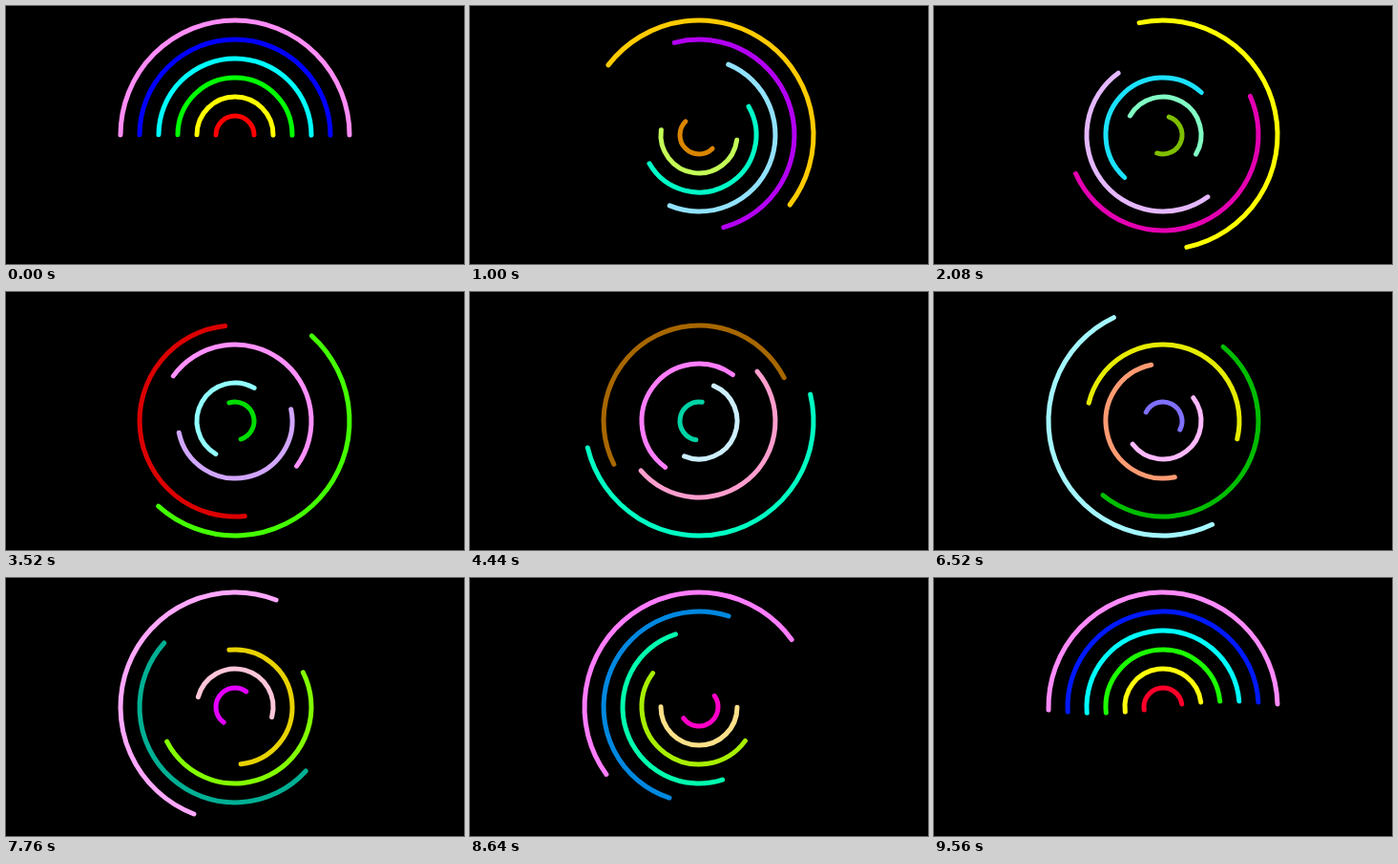
Write an HTML page that moves like this. It is 480 px wide and 270 px high and loops after 9.6 s.

```html
<!DOCTYPE html>
<html lang="en">
<head>
<meta charset="utf-8">
<title>Rainbow rings</title>
<style>
  html, body { margin: 0; width: 100%; height: 100%; overflow: hidden; background: #000; }
  svg { display: block; width: 100vw; height: 100vh; }
  path { fill: none; stroke-width: 5; stroke-linecap: round; }
</style>
</head>
<body>
<svg id="stage" viewBox="0 0 480 270"></svg>
<script>
const LOOP = 9600;
const CX = 240, CY = 135, GAP = 20;

// Linear-light base colours, innermost ring first.
const BASES = [
  [1, 0, 0], [1, 1, 0], [0, 1, 0],
  [0, 1, 1], [0, 0, 1], [2.23, 0.266, 0.93]
];

const stage = document.getElementById('stage');

// Split a colour into luma and a polar chroma vector.
function toPolar([r, g, b]) {
  const y = 0.299 * r + 0.587 * g + 0.114 * b;
  const cb = (b - y) / 1.772, cr = (r - y) / 1.402;
  return { y, chroma: Math.hypot(cb, cr), hue: Math.atan2(cr, cb) };
}

function encode(v) {
  const c = Math.min(1, Math.max(0, v));
  const s = c <= 0.0031308 ? 12.92 * c : 1.055 * c ** (1 / 2.4) - 0.055;
  return Math.round(255 * s);
}

// Turn the hue at constant luma, then clip to the screen gamut.
function shifted({ y, chroma, hue }, turn) {
  const cb = chroma * Math.cos(hue + turn);
  const cr = chroma * Math.sin(hue + turn);
  const rgb = [y + 1.402 * cr, y - 0.344 * cb - 0.714 * cr, y + 1.772 * cb];
  return `rgb(${rgb.map(encode).join(',')})`;
}

const rings = BASES.map((base, i) => {
  const r = GAP * (i + 1);
  const path = document.createElementNS('http://www.w3.org/2000/svg', 'path');
  path.setAttribute('d', `M${CX - r} ${CY}A${r} ${r} 0 0 1 ${CX + r} ${CY}`);
  stage.append(path);
  return { path, turns: BASES.length - i, color: toPolar(base) };
});

function draw() {
  const phase = (performance.now() % LOOP) / LOOP;
  for (const { path, turns, color } of rings) {
    path.setAttribute('transform', `rotate(${360 * turns * phase} ${CX} ${CY})`);
    path.setAttribute('stroke', shifted(color, 2 * Math.PI * phase));
  }
  requestAnimationFrame(draw);
}
draw();
</script>
</body>
</html>
```
